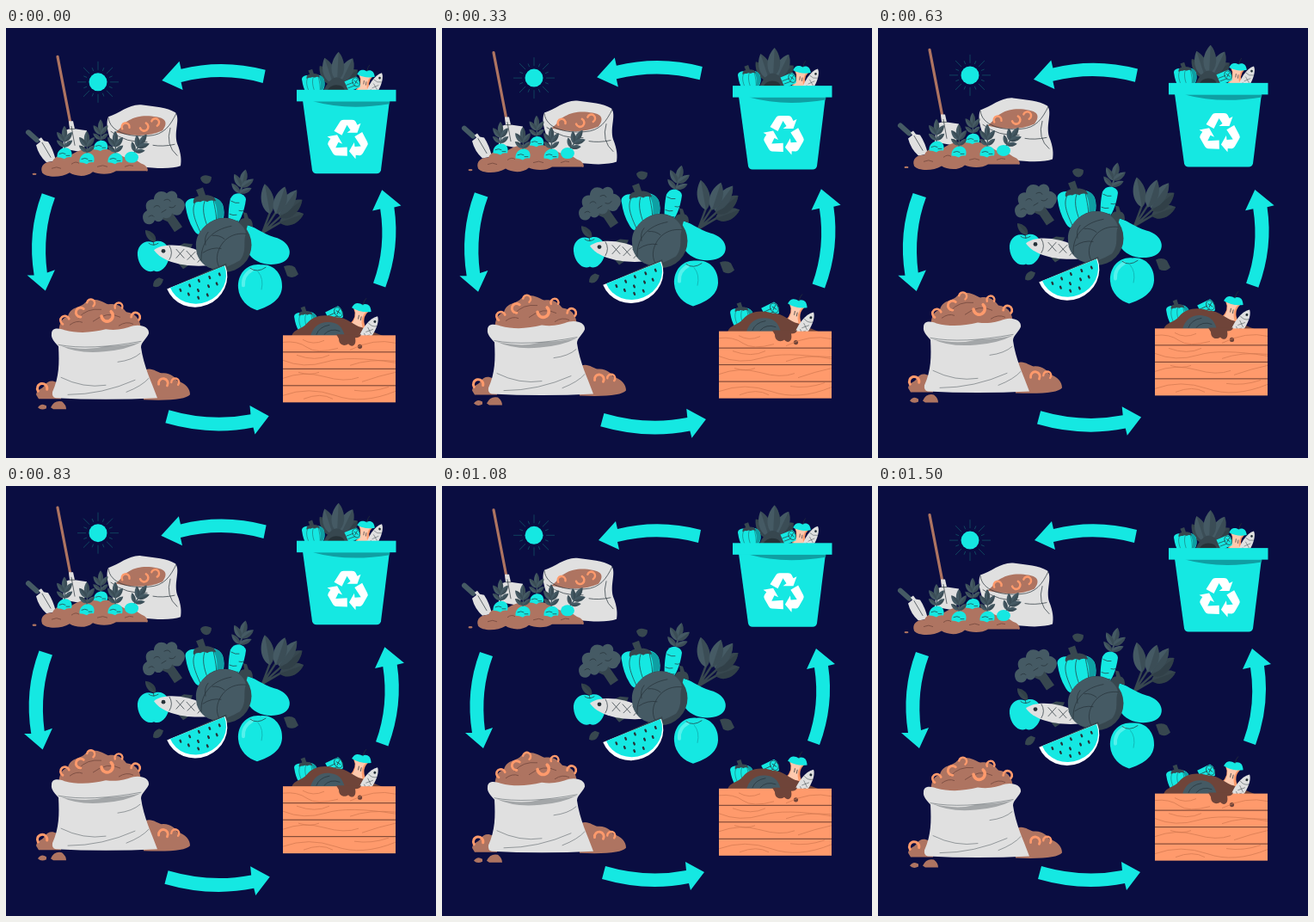
Recreate the animation shown at these times as an HTML page. Size 500 px wide and 500 px high, loop 1.54 s.

```html
<!DOCTYPE html>
<html lang="en">
<head>
<meta charset="utf-8">
<title>Compost cycle</title>
<style>
html, body { margin: 0; height: 100%; overflow: hidden; background: #0a0d41 }
svg { display: block; width: 100vw; height: 100vh }
.teal { fill: #15e8e2 } .shade { fill: #0f9fa3 } .grey { fill: #e0e0e0 } .soil { fill: #ae7461 }
.earth { fill: #6f4439 } .slate { fill: #455a64 } .dark { fill: #37474f } .orange { fill: #ff9a6c }
.ink { fill: none; stroke: #263238; stroke-width: .7; stroke-linecap: round }
.worm { fill: none; stroke: #ff9a6c; stroke-width: 3.2; stroke-linecap: round }
</style>
</head>
<body>
<svg viewBox="0 0 500 500">
<defs>
  <g id="leaf">
    <path d="M0 0C-7-5-6-17 0-24C6-17 7-5 0 0Z"/>
    <path d="M0 0V-24C6-17 7-5 0 0Z" fill="#263238" opacity=".3"/>
  </g>
  <g id="sprig" class="slate">
    <path d="M0 0Q1-10 0-20" fill="none" stroke="#455a64" stroke-width="1.5"/>
    <use href="#leaf" transform="translate(0 -12) scale(.65)"/>
    <use href="#leaf" transform="translate(0 -9) rotate(-38) scale(.6)"/>
    <use href="#leaf" transform="translate(0 -9) rotate(38) scale(.6)"/>
    <use href="#leaf" transform="translate(0 -3) rotate(-50) scale(.5)"/>
    <use href="#leaf" transform="translate(0 -3) rotate(50) scale(.5)"/>
  </g>
  <g id="turnip">
    <use href="#sprig" transform="translate(0 -5)"/>
    <path class="teal" d="M-8.500 4C-9-3-4-7 1-7C7-7 10-2 8 4Q3 3 0 6Q-4 4-8.500 4Z"/>
    <path class="ink" d="M-6 0q4-2 7 0M2 2h4"/>
  </g>
  <g id="pepper">
    <path class="teal" d="M209 200C206 190 218 188 228 190C236 185 249 189 252 197C256 210 252 219 245 223C236 230 224 238 218 226C213 218 210 208 209 200Z"/>
    <path class="shade" d="M240 190C248 189 253 195 253 203C254 213 250 220 244 223C246 211 247 199 240 190Z"/>
    <path class="ink" d="M221 193C214 202 220 216 226 229M231 193C227 204 232 217 236 227M241 191C243 202 246 212 244 223"/>
    <path class="dark" d="M221 180l8-3 3 9c7 0 11 2 12 7q-7-2-10 1q-4-3-8 0q-4-1-8 2c-1-6 2-8 6-9z"/>
  </g>
  <g id="fish">
    <path class="grey" d="M0 0C8-8 35-9 62 5V18C32 20 9 13 0 0Z"/>
    <path class="ink" d="M18-5Q23 3 18 11M26-1l9 10M35-1l-9 10M38 1l9 10M48 2l-9 9M50 4l9 9M59 5l-8 9"/>
    <circle cx="11" cy="1" r="2.4" fill="#263238"/>
  </g>
  <g id="core">
    <path class="orange" d="M-9-9Q0-6 9-9Q2 0 10 11Q0 15-10 11Q-2 0-9-9Z"/>
    <path d="M-8-9Q0-6 7-9Q0 0 6 11H-8Q-2 0-8-9Z" fill="#ffc9ae"/>
    <path class="teal" d="M-11-9C-9-17-3-16 0-15C5-18 10-17 12-9Q0-5-11-9Z"/>
    <path class="ink" d="M1-15Q1-20 3-23M-1-2v4M2-1v4" stroke-width="1.1"/>
  </g>
  <g id="can">
    <path class="teal" d="M-10-5L6-9Q12-4 9 5L-6 9Z"/>
    <ellipse class="ink" cx="5" cy="-2" rx="4.500" ry="6" transform="rotate(-18 5 -2)"/>
    <path class="ink" d="M-8 0L1-2M-6 4L3 2M3-4l4 4M7-5l-4 5"/>
  </g>
  <path id="worm" class="worm" d="M-5 4A6 6 0 1 1 6 2"/>
  <path id="chaser" d="M-16-10L-9-21Q-8-23-5-23H5Q8-23 9-21L11-17L15-19L11-8L-1-8L3-11L-1-17L-7-5Z"/>
</defs>

<g id="arrows" class="teal">
  <path d="M301 51Q252 38 204 50L202 41L182 63L206 74L204 65Q252 53 298 66Z"/>
  <path d="M44 193L59 198Q44 238 50 284L59 281L48 305L27 287L35 287Q27 238 44 193Z"/>
  <path d="M425 296L439 301Q456 255 449 209L457 207L435 189L424 213L433 211Q440 255 425 296Z"/>
  <path d="M190 442Q238 456 284 447L283 437L305 449L289 470L287 462Q238 472 186 457Z"/>
</g>

<g id="scene">
  <!-- garden -->
  <circle class="teal" cx="107" cy="54.500" r="10.500"/>
  <g id="rays" stroke="#125a6a" stroke-width=".7"></g>
  <path d="M60 25L76 108" stroke="#ae7461" stroke-width="3.200" stroke-linecap="round"/>
  <path class="grey" d="M68 111L74 109L73 100H78L80 109L94 111Q95 126 88 136L66 132Z"/>
  <path class="ink" d="M76 106L80 128M74 109h6"/>
  <path d="M26 113L36 122" stroke="#455a64" stroke-width="6" stroke-linecap="round"/>
  <path class="grey" d="M35 128L40 124L38 121L41 119L44 123L49 124Q55 133 58 146L47 148Q38 140 35 128Z"/>
  <path class="ink" d="M42 125L52 142"/>
  <path class="grey" d="M119 95C132 91 143 80 157 81C173 83 187 84 197 90C203 98 195 111 199 126C204 138 204 146 203 152Q190 157 156 153L128 142C123 124 114 107 119 95Z"/>
  <path class="soil" d="M127 113C134 109 134 104 143 99C152 93 165 93 175 95C187 97 188 103 182 111Q160 121 127 113Z"/>
  <path class="ink" d="M119 96C121 113 143 119 166 117C184 116 191 105 198 91M122 112Q140 126 164 124M191 108Q185 128 199 140M171 128Q182 130 196 127"/>
  <use href="#worm" transform="translate(139 106) scale(.75)"/>
  <use href="#worm" transform="translate(161 107) rotate(150) scale(.8)"/>
  <use href="#worm" transform="translate(174 101) rotate(50) scale(.75)"/>
  <path class="soil" d="M42 160C39 151 46 147 54 147C58 138 70 137 76 139C86 132 98 131 109 133C122 130 129 138 138 142C149 140 153 148 159 150C166 153 166 160 163 158H128C121 163 107 162 101 159C93 166 80 164 74 160C64 166 47 166 42 160Z"/>
  <path d="M53 155q6-3 11 0M76 150q5-4 9-1M106 153q7-3 12 0M138 153q6-3 10-1" fill="none" stroke="#7f5145"/>
  <ellipse class="soil" cx="33" cy="161.500" rx="2.500" ry="1.200"/>
  <use href="#turnip" transform="translate(68 138)"/>
  <use href="#turnip" transform="translate(110 129) scale(.95)"/>
  <use href="#turnip" transform="translate(94 144)"/>
  <use href="#turnip" transform="translate(127 144)"/>
  <use href="#sprig" transform="translate(148 138) rotate(34)"/>
  <ellipse class="teal" cx="146" cy="142" rx="8" ry="6.500"/>

  <!-- bin -->
  <g class="slate" transform="translate(381 63)">
    <use href="#leaf" class="dark" transform="translate(0 -5) rotate(-36) scale(1.300 1.150)"/>
    <use href="#leaf" class="dark" transform="translate(9 -8) rotate(52) scale(1.500 1)"/>
    <use href="#leaf" transform="translate(-1 -7) rotate(-18) scale(1.400 1.300)"/>
    <use href="#leaf" transform="translate(9 -9) rotate(26) scale(1.500 1.250)"/>
    <use href="#leaf" transform="translate(4 -10) rotate(3) scale(1.500 1.400)"/>
    <path class="dark" d="M-12 2Q-6-12 3-14Q16-12 18 2Z"/>
    <path d="M-8 2Q-4-5 3-5Q12-5 13 2Z" fill="#263238"/>
  </g>
  <use href="#pepper" transform="translate(221 -65) scale(.59)"/>
  <use href="#core" transform="translate(417 55) rotate(8) scale(.9)"/>
  <use href="#can" transform="translate(403 57) rotate(-8) scale(.9)"/>
  <use href="#fish" transform="translate(437 44) rotate(108) scale(.57)"/>
  <path class="teal" d="M345 76H446L436 157Q435 161 431 161H361Q357 161 356 157Z"/>
  <path class="shade" d="M357 77H446.500L446 80Q397 88 357 77Z"/>
  <rect class="teal" x="338" y="63.500" width="115.500" height="13.500"/>
  <g fill="#fff" transform="translate(397.500 121.500)">
    <use href="#chaser"/>
    <use href="#chaser" transform="rotate(120)"/>
    <use href="#chaser" transform="rotate(240)"/>
  </g>

  <!-- produce -->
  <path class="dark" d="M177 212L191 203L205 223L196 229L188 217Z"/>
  <path class="slate" d="M160 216C157 208 162 205 164 204C160 195 166 190 172 191C172 182 181 179 187 184C193 177 201 184 199 189C209 191 210 200 205 205C203 211 195 210 193 207C192 213 186 214 183 212C181 219 174 217 173 215C171 222 162 221 160 216Z"/>
  <path class="ink" d="M172 200q4-4 7 0M184 192q5-3 7 1M166 211q4-3 6 0M190 200q5 2 7-2M181 206l5-3"/>
  <use href="#pepper"/>
  <use href="#sprig" transform="translate(271 187) rotate(14) scale(1.300 1.150)"/>
  <path class="teal" d="M261 190Q264 184 270 184Q278 185 279 191C277 206 272 217 266 223L259 222C258 210 259 198 261 190Z"/>
  <path class="ink" d="M262 193q5 3 9 2M271 204q4 1 5 0M260 208q4 2 8 1M265 216h5"/>
  <g class="slate" transform="translate(298 230)">
    <path d="M0 0L9-24M0 0L17-26M0 0L22-20M0 0L22-13" stroke="#37474f" stroke-width="2.500"/>
    <use href="#leaf" transform="translate(9 -22) rotate(-10) scale(1.500 1.480)"/>
    <use href="#leaf" class="dark" transform="translate(20 -12) rotate(70) scale(1.500 1.250)"/>
    <use href="#leaf" class="dark" transform="translate(20 -18) rotate(52) scale(1.600 1.400)"/>
    <use href="#leaf" transform="translate(19 -21) rotate(36) scale(1.500)"/>
    <use href="#leaf" transform="translate(16 -22) rotate(18) scale(1.500 1.400)"/>
  </g>
  <path class="teal" d="M274 219C290 222 298 231 312 235C332 240 335 258 322 264C308 270 288 266 281 252C274 240 266 228 274 219Z"/>
  <path class="dark" d="M271 222C270 215 274 213 277 213L276 206L280 207L282 213Q287 214 287 223L281 221L279 228L275 224Z"/>
  <path class="teal" d="M153 256C152 245 161 237 171 241C181 236 191 244 190 256C189 268 180 278 172 274C163 278 154 268 153 256Z"/>
  <path class="ink" d="M172 244Q172 238 168 233M166 242q5 4 11 0"/>
  <use href="#leaf" class="dark" transform="translate(174 240) rotate(-42) scale(.85 .75)"/>
  <path class="dark" d="M199 246L207 242L217 243L214 250ZM200 265L212 268L206 272Z"/>
  <use href="#fish" transform="translate(172 250)"/>
  <circle class="dark" cx="254" cy="244" r="31.500"/>
  <path class="slate" d="M221 246C220 232 230 219 246 214C262 209 278 220 279 231C275 240 281 251 272 262C258 270 247 274 235 270C225 264 221 256 221 246Z"/>
  <path class="ink" d="M227 262C226 240 240 226 262 222M232 244q-2-9 3-15M240 233q8-1 14 4M229 253q10-7 21-5M279 231C262 229 250 239 246 254Q244 263 248 270"/>
  <path class="dark" d="M226 166C229 161 236 163 239 165Q239 172 233 173Q227 172 226 166ZM323 269Q331 266 336 270L340 278Q334 284 327 280ZM171 292Q171 284 178 282L183 284Q181 293 174 293Z"/>
  <g transform="translate(222.500 281) rotate(-22)">
    <path class="dark" d="M-38 0L37-2A38 38 0 0 1-38 0Z"/>
    <path fill="#fff" d="M-38 0H35A36 34 0 0 1-38 0Z"/>
    <path class="teal" d="M-34 0H34A33 30 0 0 1-34 0Z"/>
    <path d="M-24 6v2M-12 5v2M0 4v2M13 5v2M25 6v2M-17 14v2M-5 14v2M8 14v2M18 15v2M-8 22v2M3 23v2" stroke="#263238" stroke-width="2.300" stroke-linecap="round"/>
  </g>
  <path class="teal" d="M270 294C269 277 281 265 296 267C311 265 322 278 321 293C320 308 307 315 292 320C282 317 271 308 270 294Z"/>
  <path d="M276 291Q275 279 286 273" fill="none" stroke="#55f1ec" stroke-width="4" stroke-linecap="round"/>
  <path class="ink" d="M284 271Q292 277 302 270"/>
  <path d="M293 275Q300 283 297 296" fill="none" stroke="#12b9b8"/>

  <!-- crate -->
  <use href="#pepper" transform="translate(210 209) scale(.6)"/>
  <use href="#can" transform="translate(382 325) rotate(-12)"/>
  <use href="#core" transform="translate(411 328) rotate(12)"/>
  <path class="earth" d="M332 350C335 341 345 342 350 335C358 325 372 324 384 328C397 328 404 338 414 340L439 350Z"/>
  <path class="slate" d="M354 350C357 337 368 332 378 334C389 335 392 343 394 350Z"/>
  <path class="ink" d="M361 348q3-9 15-11M370 348q7-8 18-4"/>
  <use href="#fish" transform="translate(432 327) rotate(112) scale(.62)"/>
  <rect class="orange" x="322" y="349" width="131" height="78"/>
  <path class="earth" d="M384 348H413Q412 352 406 352C408 361 402 364 398 359C394 362 387 361 387 353Z"/>
  <circle class="earth" cx="411.500" cy="362" r="2.600"/>
  <path d="M322 368.500H453M322 388H453M322 407.500H453" stroke="#5c3328" stroke-width=".9"/>
  <path d="M322 357q17-2 28 6t36 1M400 366q28-14 53-8M345 354q12 7 25 1M322 378q24 10 50 2t81 1M338 372q22 8 38 0M400 384q22-8 53-5M322 399q24-9 48-2t40 1M414 403q20-7 39-11M340 392q14 4 24 0M322 419q30-11 61 0t70-5M346 423q20-8 34 0M405 413q20 3 40-4" fill="none" stroke="#d0774f" stroke-width=".7"/>

  <!-- compost sack -->
  <path class="soil" d="M35 418C36 411 43 412 45 407C50 399 59 402 64 408V423H38ZM158 391C168 384 175 392 181 393C191 392 197 398 199 402C209 405 214 411 214 418Q207 426 160 424Z"/>
  <use href="#worm" transform="translate(42 410) scale(.95)"/>
  <use href="#worm" transform="translate(183 404) rotate(20) scale(.9)"/>
  <use href="#worm" transform="translate(197 403) rotate(30) scale(.75)"/>
  <path class="soil" d="M62 352C60 334 66 329 72 327C75 315 86 318 92 311C101 303 112 310 119 313C130 311 136 317 140 322C153 324 159 333 156 352Z"/>
  <path d="M84 329Q94 317 111 319M101 333Q118 320 133 328M74 337q8-6 15-3M131 338q9-6 17-2" fill="none" stroke="#7f5145"/>
  <use href="#worm" transform="translate(68 331) rotate(-30) scale(.85)"/>
  <use href="#worm" transform="translate(86 322) rotate(-60) scale(.9)"/>
  <use href="#worm" transform="translate(99 311) rotate(40) scale(.75)"/>
  <use href="#worm" transform="translate(131 315) rotate(10) scale(.75)"/>
  <use href="#worm" transform="translate(151 327) rotate(30) scale(.85)"/>
  <use href="#worm" transform="translate(118 327) rotate(165) scale(1.100)"/>
  <path class="grey" d="M53 347C53 340 61 340 68 343C84 347 100 346 116 342C130 344 138 341 148 338C158 336 167 340 166 347C163 354 157 357 157 363C160 385 169 403 176 422Q115 425 58 422Q53 421 54 415C62 397 62 382 61 362C57 357 52 353 53 347Z"/>
  <path d="M63 361Q92 368 115 362Q140 361 157 357Q140 366 114 368Q84 371 63 361Z" fill="#a3a6a8"/>
  <path class="ink" d="M61 360Q98 367 157 356M64 398Q90 411 116 407M72 418Q112 418 150 401M130 380Q147 378 156 370M140 415Q158 408 166 399" stroke-opacity=".6"/>
  <path class="soil" d="M37 433Q41 427 47 431V434Q41 437 37 433ZM52 433Q56 424 65 426Q70 430 70 435H55Z"/>
</g>
</svg>
<script>
const LOOP = 1540, STEP = LOOP / 37, PULSE = LOOP / 5;
const byId = id => document.getElementById(id);
const rays = byId('rays'), scene = byId('scene'), arrows = byId('arrows');

for (let i = 0; i < 16; i++) {
  const end = i % 2 ? 18 : 24;
  rays.innerHTML += `<path d="M14 0H${end}" transform="translate(107 54.5) rotate(${i * 22.5})"/>`;
}

// The picture advances at 24 steps per second.
function draw(now) {
  const t = Math.floor((now % LOOP + 4) / STEP) * STEP % LOOP;
  const bob = 9.2 * Math.abs((t - 740) / 770) ** 1.3 - 0.4;
  scene.setAttribute('transform', `translate(0 ${bob})`);

  // Three outward pulses, then a rest.
  const phase = (t + 35) % LOOP / PULSE;
  const scale = phase < 3 ? 1 + 0.0465 * (1 - Math.cos(phase * 2 * Math.PI)) : 1;
  arrows.setAttribute('transform', `translate(242 250) scale(${scale}) translate(-242 -250)`);
}

let start;
function tick(now) {
  start ??= now;
  draw(now - start);
  requestAnimationFrame(tick);
}
draw(0);
requestAnimationFrame(tick);
</script>
</body>
</html>
```
